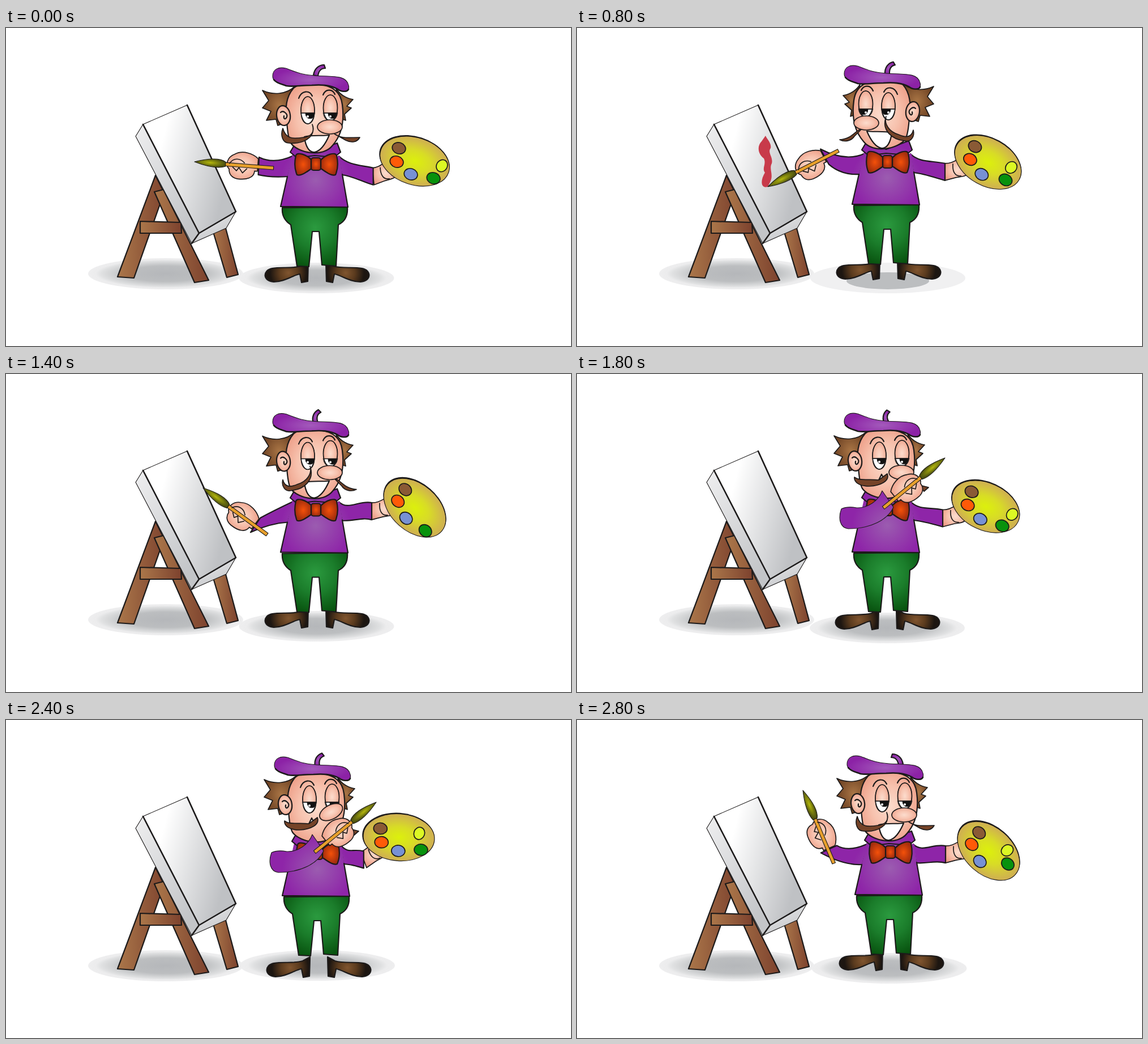
An HTML page that plays this animation: 998 by 561 pixels, repeating every 3000 ms.

```html
<!DOCTYPE html>
<html lang="en">
<head>
<meta charset="utf-8">
<title>Painter</title>
<style>
  html, body { margin: 0; width: 100%; height: 100%; overflow: hidden; background: #fff; }
  svg { display: block; width: 100%; height: 100%; }
  .ink { stroke: #1c1a1a; stroke-width: 2.2; stroke-linejoin: round; stroke-linecap: round; }
  .thin { stroke-width: 1.1; }
  .mid { stroke-width: 1.7; }
  .bold { stroke-width: 2.6; }
  .line { fill: none; }
</style>
</head>
<body>
<svg viewBox="0 0 998 561" preserveAspectRatio="none">
  <defs>
    <radialGradient id="shade">
      <stop offset="0" stop-color="#b5b7ba"/><stop offset=".5" stop-color="#bcbec0"/>
      <stop offset=".82" stop-color="#dfe0e1"/><stop offset=".9" stop-color="#ececed"/><stop offset="1" stop-color="#eeeeef"/>
    </radialGradient>
    <linearGradient id="front" gradientUnits="userSpaceOnUse" x1="268" y1="230" x2="392" y2="262">
      <stop offset="0" stop-color="#fff"/><stop offset="1" stop-color="#bfc1c4"/>
    </linearGradient>
    <linearGradient id="side" x1="0" y1="0" x2=".6" y2="1">
      <stop offset="0" stop-color="#efeff0"/><stop offset="1" stop-color="#c3c5c8"/>
    </linearGradient>
    <linearGradient id="wood">
      <stop offset="0" stop-color="#ab774a"/><stop offset="1" stop-color="#7d422e"/>
    </linearGradient>
    <radialGradient id="green" gradientUnits="userSpaceOnUse" cx="546" cy="352" r="72">
      <stop offset="0" stop-color="#2b9a3f"/><stop offset=".5" stop-color="#1b7d2b"/><stop offset="1" stop-color="#08530f"/>
    </radialGradient>
    <radialGradient id="shoe" gradientUnits="userSpaceOnUse" cx="499" cy="432" r="36">
      <stop offset="0" stop-color="#80552f"/><stop offset=".45" stop-color="#5b3b1e"/><stop offset=".9" stop-color="#1d1611"/>
    </radialGradient>
    <radialGradient id="purple" gradientUnits="userSpaceOnUse" cx="547" cy="268" r="62">
      <stop offset="0" stop-color="#9b5cb0"/><stop offset="1" stop-color="#8e25a8"/>
    </radialGradient>
    <radialGradient id="beret">
      <stop offset="0" stop-color="#a35abb"/><stop offset="1" stop-color="#8c22a6"/>
    </radialGradient>
    <radialGradient id="bow">
      <stop offset="0" stop-color="#f4510a"/><stop offset="1" stop-color="#a22d0d"/>
    </radialGradient>
    <radialGradient id="skin" r=".6">
      <stop offset="0" stop-color="#fcdccd"/><stop offset=".5" stop-color="#f7c2ae"/><stop offset="1" stop-color="#ec9b84"/>
    </radialGradient>
    <radialGradient id="hair">
      <stop offset="0" stop-color="#a97545"/><stop offset="1" stop-color="#6f4324"/>
    </radialGradient>
    <radialGradient id="board">
      <stop offset="0" stop-color="#dcf00c"/><stop offset=".45" stop-color="#d8dc26"/><stop offset="1" stop-color="#cfae52"/>
    </radialGradient>
    <radialGradient id="tuft">
      <stop offset="0" stop-color="#b5b80c"/><stop offset="1" stop-color="#4c5010"/>
    </radialGradient>
    <clipPath id="wet"><rect id="wetBox" x="300" y="180" width="60" height="110"/></clipPath>
    <path id="boot" class="ink" fill="url(#shoe)" d="M521 420L534 413L533 447L522 449L519 434C507 436 492 448 473 448C453 447 453 427 470 424C487 421 505 425 521 420Z"/>
  </defs>

  <!-- easel -->
  <ellipse cx="282" cy="433.5" rx="137" ry="27.5" fill="url(#shade)"/>
  <g class="ink" fill="url(#wood)">
    <path d="M264 260L197 439L226 441L273 308L284 300Z"/>
    <path d="M366 360L388 353L410 435L390 440Z"/>
    <path d="M262 289L278 285L358 445L333 449Z"/>
    <path d="M237 341L309 343L310 362L237 362Z"/>
  </g>
  <g class="ink thin">
    <path fill="url(#side)" d="M242 170L229 191L328 380L341 362Z"/>
    <path fill="url(#side)" d="M341 362L406 324L389 353L328 380Z"/>
    <path fill="url(#front)" d="M242 170L320 136L406 324L341 362Z"/>
    <path class="line bold" d="M320 136L406 324L341 362L242 170M341 362L328 380"/>
  </g>
  <path id="smear" clip-path="url(#wet)" fill="#c83a4a" d="M333 190C336 197 344 203 342 212C336 220 347 228 344 239C339 248 347 258 342 270L337 280C325 284 323 270 332 255C326 247 335 240 330 230C319 222 318 208 326 200Z"/>

  <!-- painter -->
  <g id="shadow">
    <ellipse id="pool" rx="137" ry="27"/>
    <ellipse id="core" cy="5" rx="73" ry="15" fill="#bcbec0"/>
  </g>
  <g id="feet">
    <use href="#boot"/><use href="#boot" transform="translate(1099) scale(-1 1)"/>
  </g>
  <g id="grip">
    <path class="ink mid" fill="url(#skin)" d="M0 -15C10 -15 15 -18 22 -22L44 -2C40 9 28 8 19 10L0 15Z"/>
    <path class="ink line mid" d="M14 -14C13 0 18 8 28 7"/>
  </g>
  <g id="palette">
    <ellipse cx="-1" cy="-1.2" rx="64" ry="42" fill="#1c1a1a"/>
    <ellipse class="ink thin" rx="63" ry="41.5" fill="url(#board)"/>
    <g id="spots" class="ink mid"></g>
  </g>
  <path id="farSleeve" class="ink" fill="url(#purple)"/>
  <path id="nearSleeve" class="ink" fill="url(#purple)"/>
  <g id="body">
    <path class="ink" fill="url(#green)" d="M488 317L603 316C604 330 600 341 587 347L583 420L558 418L553 359L541 359L535 421L514 420L503 347C492 340 487 330 488 317Z"/>
    <path fill="url(#purple)" d="M506 222L590 226L594 258L604 316L485 315L497 262Z"/>
    <path class="ink line" d="M497 262L485 315L604 316L594 258"/>
    <path class="ink" fill="url(#purple)" d="M512 202L502 219L514 229L545 225L580 228L591 219L585 203L545 218Z"/>
  </g>
  <g id="head">
    <path class="ink mid" fill="url(#hair)" d="M512 101C495 119 470 118 453 110L464 128L453 141L468 147L460 163L477 161L480 172L498 166C491 140 497 120 512 101Z"/>
    <path class="ink mid" fill="url(#hair)" d="M583 106C588 116 600 124 613 126L602 138L610 141L598 152L600 163L592 160Z"/>
    <path class="ink" fill="url(#skin)" d="M508 106C494 122 493 142 496 165C497 180 499 196 503 203C516 221 560 229 577 207C592 190 598 165 594 135C591 112 575 102 555 100C535 98 518 97 508 106Z"/>
    <ellipse class="ink" cx="490" cy="154.5" rx="12" ry="17.5" fill="url(#skin)" transform="rotate(-8 490 154)"/>
    <path class="ink line" d="M485 149C490 144 498 152 496 157C493 163 490 160 491 155"/>
    <g id="eyes" class="ink thin"></g>
    <path class="ink line" d="M517 124C522 110 536 109 541 120M560 118C565 106 577 108 581 117"/>
    <path id="mouth" class="ink" fill="#fff"/>
    <path id="tashL" class="ink mid" fill="#754328"/>
    <path id="tashR" class="ink mid" fill="#754328"/>
    <ellipse id="nose" class="ink mid" cx="572" cy="174.5" rx="22" ry="12.5" fill="url(#skin)"/>
  </g>
  <g id="hat">
    <path id="stem" class="ink" fill="url(#beret)" d="M543 83C545 71 553 65 562 65L564 71C556 71 552 76 551 85Z"/>
    <path class="ink thin" fill="url(#beret)" d="M471 85C471 73 481 68 494 71C507 75 520 83 545 84C575 86 601 82 605 101C607 107 603 113 599 112C593 112 589 110 586 108C570 99 552 100 535 101C515 102 502 104 495 102C483 97 471 95 471 85Z"/>
    <path class="ink line bold" d="M473 91C478 98 488 99 495 102C508 104 520 101 540 101C556 100 572 100 586 108C592 113 603 113 605 108"/>
  </g>
  <g id="tie" class="ink" fill="url(#bow)">
    <path id="wing" d="M540 233C531 223 514 218 512 225C509 238 510 250 514 259C522 262 533 252 540 248Z"/>
    <use href="#wing" transform="translate(1096) scale(-1 1)"/>
    <rect x="539" y="229" width="17" height="22" rx="4"/>
  </g>
  <path id="foldedArm" class="ink thin" fill="url(#purple)" d="M538 207C532 224 513 238 493 237C482 235 474 235 466 239C460 255 463 272 478 274C518 274 548 258 558 236Z"/>
  <g id="brush">
    <path class="ink mid" fill="url(#skin)" d="M112 -14C103 -22 84 -28 70 -19C57 -13 54 1 62 8C62 16 67 23 78 24C94 25 107 20 107 8L112 8Z"/>
    <rect class="ink thin" x="53" y="-3" width="87" height="6" fill="#e8a02c"/>
    <path class="ink thin" fill="url(#tuft)" d="M0 0C18 -6 42 -12 55 -4L55 4C42 9 20 6 0 0Z"/>
    <path class="ink line mid" d="M62 -2C68 -13 80 -13 88 -5M68 4L75 10L79 4L86 13L93 5"/>
  </g>
</svg>
<script>
const STEP = 200, COUNT = 15;
const $ = id => document.getElementById(id);
const set = (id, attrs) => { for (const k in attrs) $(id).setAttribute(k, attrs[k]); };
const move = (id, x, y, rest = "") => set(id, { transform: `translate(${x} ${y}) ${rest}` });
const show = (el, on) => { el.style.display = on ? "" : "none"; };
const pt = (x, y) => x.toFixed(1) + " " + y.toFixed(1);
const spin = (x, y, deg) => {
  const a = deg * Math.PI / 180, c = Math.cos(a), s = Math.sin(a);
  return [x * c - y * s, x * s + y * c];
};

// One entry per pose, each held for STEP ms.
const body = [[0,0],[3,-9],[3,-6],[2,-6],[1,-4],[1,-4],[0,-3],[0,-.5],[0,-1],[1,-1],[2,-2],[3,-5],[3,-5],[5,-9],[6,-7]];
const feet = [[0,0],[3,-6],[3,-6],[2,-6],[1,-5],[1,-3],[0,-2],[0,-1],[0,0],[-1,2],[-1,4],[1,5],[3,5],[5,-2],[6,-7]];
const ground = [441,439,439,440,441,443,444,445,446,448,450,440,433,440,438];
// x, y of the brush tip, then tilt
const brush = [[333,236,4.5],[346,192,18],[343,154,31],[327,216,5],[337,280,-27],[336,270,-20],[338,235,5],[348,201,36],
  [390,150,67],[650,148,39],[652,147,39],[390,146,67],[654,145,39],[656,142,39],[399,124,67]];
const palette = [[722,235,18],[728,235,24],[728,235,29],[729,236,29],[726,237,29],[720,237,34],[721,237,38],[722,236,41],
  [724,235,35],[722,234,25],[693,209,6],[694,208,5],[694,207,4],[726,230,33],[727,231,41]];
const stemTilt = [0,-10,-13,-13,-12,-15,-20,-27,-35,-40,-47,-30,-19,-25,0];
const facing = "RLLLLLLRRRRRRRR";
const tash = "AAAABBBBBCCCCCA";
const wet = { 3: 32, 4: 110, 5: 110, 6: 110 };
// green and yellow paint slide about on the board
const slide = { 2: [32,29,43,7], 4: [31,31,41,9], 10: [42,22,41,-11], 11: [41,22,39,-9], 12: [39,22,36,-7], 14: [34,23,33,-1] };
const FLAT_SHADOW = 4, NO_YELLOW = 7, NOSE_UP = 12, STEM_BACK = 14;

const smile = "M527 192C529 208 535 220 545 219C557 217 565 203 571 189C560 191 540 188 527 192Z";
const tooth = "M532 188L537 178L541 186Z";
const tashes = {
  A: ["M541 170C546 182 540 192 525 193C508 196 494 196 489 177C484 190 489 203 500 203C522 205 549 195 541 170Z",
      "M579 186C592 196 605 193 625 193C620 202 610 203 600 198Z"],
  B: ["M537 163C541 176 532 190 515 195C502 201 492 200 489 187C486 198 493 209 504 206C526 204 546 188 537 163Z",
      "M579 184C590 186 597 203 619 204C610 209 598 206 593 198Z"],
  C: ["M547 177C552 190 535 198 515 199C498 199 488 192 489 183C498 190 515 186 532 188Z",
      "M600 196L620 201L612 208Z"]
};
const spots = [["#8a5a35",-33.7,-13.2],["#ff5a08",-30.1,10.8],["#7791d4",.5,24],["#08920d",40.7,18.3],["#dcf824",48.1,-7.2]];

$("spots").innerHTML = spots.map(([c], i) =>
  `<ellipse rx="${i == 4 ? 9.5 : 12}" ry="${i == 4 ? 11 : 10}" fill="${c}"/>`).join("");
const spotEls = [...$("spots").children];

const eye = (x, y, rx, ry, px) => {
  const k = rx * .98, low = y + ry, side = low - ry * .28;
  return `<ellipse cx="${x}" cy="${y}" rx="${rx}" ry="${ry}" fill="url(#skin)"/>
  <path d="M${x - k} 150C${x - k} ${side} ${x - 6} ${low} ${x} ${low}S${x + k} ${side} ${x + k} 150Z" fill="#fff"/>
  <path d="M${px - 8} 150H${px + 8}C${px + 8} 163 ${px - 8} 163 ${px - 8} 150Z" fill="#111"/>
  <circle cx="${px - 4}" cy="156" r="2" fill="#fff" stroke="none"/>
  <ellipse class="line mid" cx="${x}" cy="${y}" rx="${rx}" ry="${ry}"/>
  <path class="line mid" d="M${x - rx} 150H${x + rx}"/>`;
};
$("eyes").innerHTML = eye(533, 145, 12, 24, 537) + eye(573, 141, 12.5, 23, 577);

function drawPalette(i, bx, by) {
  const [x, y, tilt] = palette[i], s = slide[i];
  move("palette", x, y, `rotate(${tilt})`);
  spotEls.forEach((el, n) => {
    let p = spots[n].slice(1);
    if (s && n > 2) p = spin(s[n * 2 - 6], s[n * 2 - 5], -tilt);
    el.setAttribute("transform", `translate(${pt(...p)})${n == 4 ? " rotate(15)" : ""}`);
  });
  show(spotEls[4], i != NO_YELLOW);

  const wx = x - 59 - Math.min(17, tilt * .8), wy = y + 43 - tilt * .9;
  move("grip", wx, wy, `rotate(${Math.min(0, tilt - 24)})`);
  set("farSleeve", { d: `M${pt(588 + bx, 226 + by)}C${pt(604 + bx, 242 + by)} ${pt(wx - 22, wy - 20)} ${pt(wx, wy - 15)}` +
    `L${pt(wx, wy + 15)}C${pt(wx - 18, wy + 10)} ${pt(612 + bx, 261 + by)} ${pt(593 + bx, 259 + by)}Z` });
}

function drawBrush(i, bx, by) {
  const [x, y, tilt] = brush[i], folded = x > 560;
  move("brush", x, y, `${folded ? "scale(-1 1) " : ""}rotate(${tilt})`);
  show($("foldedArm"), folded);
  show($("nearSleeve"), !folded);
  if (folded) return;
  const at = (u, v) => { const [dx, dy] = spin(u, v, tilt); return pt(x + dx, y + dy); };
  set("nearSleeve", { d: `M${pt(508 + bx, 225 + by)}Q${pt(474 + bx, 241 + by)} ${at(113, -17)}` +
    `L${at(114, 14)}Q${pt(466 + bx, 264 + by)} ${pt(498 + bx, 262 + by)}Z` });
}

function draw(i) {
  const [bx, by] = body[i], left = facing[i] == "L";
  for (const id of ["body", "hat", "tie", "foldedArm"]) move(id, bx, by);
  move("feet", ...feet[i]);
  move("head", bx + (left ? 1082 : 0), by - (left ? 3 : 0), left ? "scale(-1 1)" : "");
  set("stem", { transform: i == STEM_BACK ? "translate(1113 2) scale(-1 1)"
    : `translate(0 ${-stemTilt[i] * .12}) rotate(${stemTilt[i]} 547 84)` });

  const flat = i == FLAT_SHADOW;
  move("shadow", 548.5 + feet[i][0] / 2, ground[i]);
  set("pool", { fill: flat ? "#f0f0f1" : "url(#shade)" });
  show($("core"), flat);

  const [near, far] = tashes[tash[i]];
  set("tashL", { d: near });
  set("tashR", { d: far });
  set("mouth", { d: tash[i] == "C" ? tooth : smile });
  set("nose", { transform: i == NOSE_UP ? "translate(-1 -7) rotate(-28 572 174)" : "" });

  show($("smear"), i in wet);
  set("wetBox", { height: wet[i] || 0 });
  drawPalette(i, bx, by);
  drawBrush(i, bx, by);
}

const start = performance.now();
let last = -1;
function tick() {
  const i = Math.floor((performance.now() - start) / STEP) % COUNT;
  if (i !== last) draw(last = i);
  requestAnimationFrame(tick);
}
tick();
</script>
</body>
</html>
```
